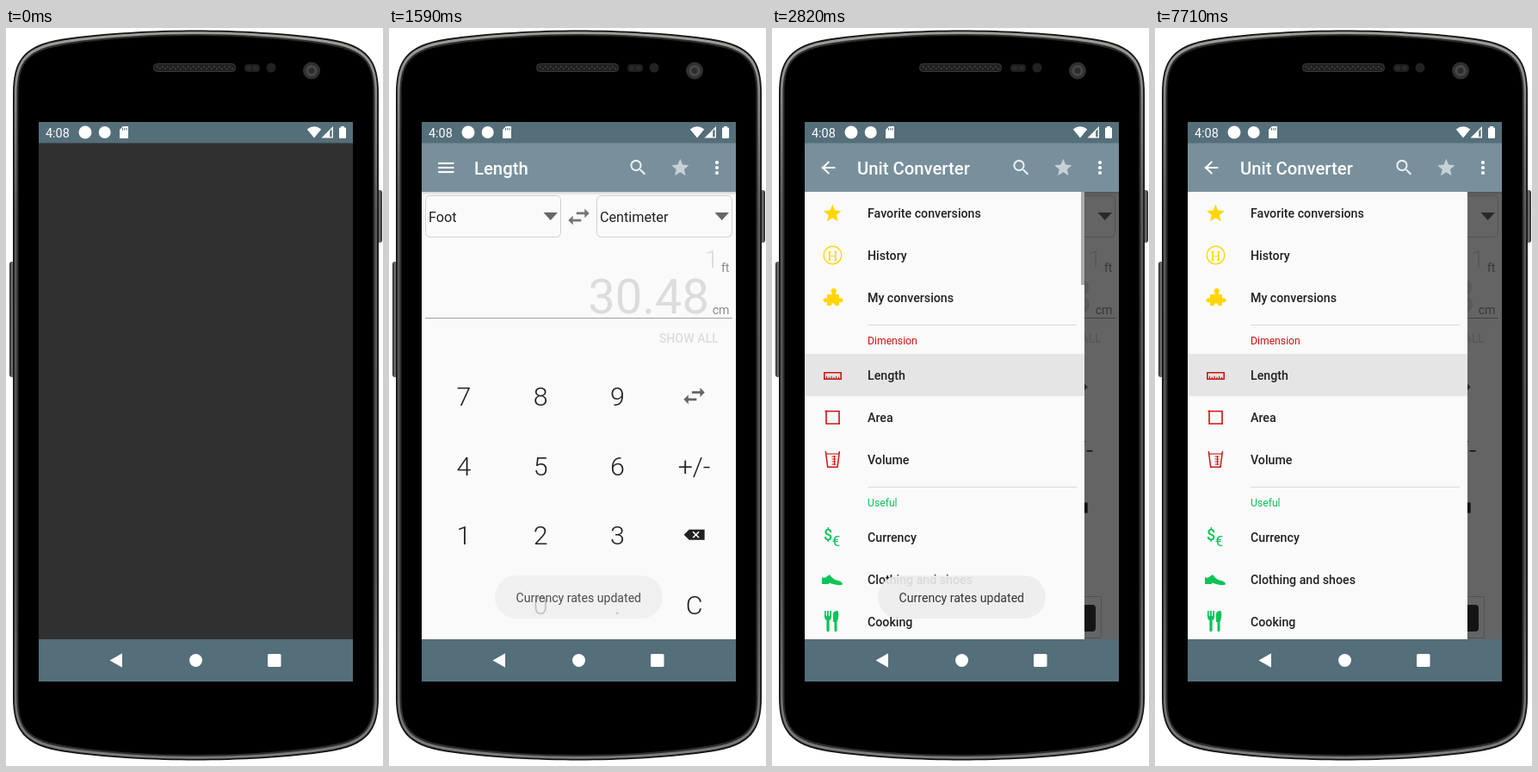
An HTML page with a canvas for the animation above (8000 ms loop, 438 by 856 pixels).

```html
<!DOCTYPE html>
<html lang="en">
<head>
<meta charset="utf-8">
<title>Unit converter demo</title>
<style>
html, body { margin: 0; width: 100%; height: 100%; overflow: hidden; background: #fff; }
canvas { display: block; }
</style>
</head>
<body>
<canvas id="stage" width="438" height="856"></canvas>
<script>
const ctx = document.getElementById('stage').getContext('2d');
const LOOP = 8000, TICK = 76.92, FIRST = 275;
const LEFT = 38, TOP = 190, BOTTOM = 709, DRAWER = 325;
const INK = '#212121', YELLOW = '#ffd600', RED = '#cc1512', GREEN = '#0bc458';

const ICONS = {
  swap: 'M7 11L3 15l4 4v-3h7v-2H7zM21 9l-4-4v3h-7v2h7v3z',
  search: 'M15.5 14h-.8l-.3-.3A6.5 6.5 0 1 0 13.7 14.4l.3.3v.8l5 5L20.5 19zM9.5 14a4.5 4.5 0 1 1 0-9 4.5 4.5 0 0 1 0 9z',
  star: 'M12 17.3L18.2 21l-1.7-7L22 9.2l-7.2-.6L12 2 9.2 8.6 2 9.2l5.5 4.8L5.8 21z',
  puzzle: 'M4 7H9.5V5A3 3 0 1 1 14 5V7H18V11.5H19A2.5 2.5 0 1 1 19 16H18V20H13V18.5A2.2 2.2 0 0 0 9 18.5V20H4V16H3A2.5 2.5 0 1 1 3 11.5H4z',
  shoe: 'M0 3Q3 5 6 2L9 0Q13 6 19 7Q24 8 24 11.5Q19 13 13 11L8 9.5V11H0z',
  fork: 'M0 0h1.6v6h1.4V0h1.8v6h1.4V0H8v7Q8 10 5.6 11V23Q4 25.5 2.4 23V11Q0 10 0 7z',
  knife: 'M10 13V4Q10 0 15.5 0Q17.5 6 14.5 13V23Q13 25.5 11.5 23V13z'
};
for (const k in ICONS) ICONS[k] = new Path2D(ICONS[k]);

const lerp = (a, b, p) => a + (b - a) * p;
const clamp = v => Math.min(1, Math.max(0, v));
const ramp = (t, a, b) => clamp((t - a) / (b - a));

function rect(x, y, w, h, color) {
  ctx.fillStyle = color;
  ctx.fillRect(x, y, w, h);
}

function round(x, y, w, h, r, fill, stroke) {
  ctx.beginPath();
  ctx.roundRect(x, y, w, h, r);
  if (fill) { ctx.fillStyle = fill; ctx.fill(); }
  if (stroke) { ctx.strokeStyle = stroke; ctx.lineWidth = 1; ctx.stroke(); }
}

function disc(x, y, r, color) {
  ctx.beginPath();
  ctx.arc(x, y, r, 0, 7);
  ctx.fillStyle = color;
  ctx.fill();
}

function poly(points, color) {
  ctx.beginPath();
  points.forEach(([x, y]) => ctx.lineTo(x, y));
  ctx.closePath();
  ctx.fillStyle = color;
  ctx.fill();
}

function line(points, color, width) {
  ctx.beginPath();
  points.forEach(([x, y], i) => i ? ctx.lineTo(x, y) : ctx.moveTo(x, y));
  ctx.strokeStyle = color;
  ctx.lineWidth = width;
  ctx.stroke();
}

function text(str, x, y, size, weight, color, align = 'left', family = 'Roboto, sans-serif') {
  ctx.font = `${weight} ${size}px ${family}`;
  ctx.textAlign = align;
  ctx.fillStyle = color;
  ctx.fillText(str, x, y);
}

function shape(name, x, y, scale, color) {
  ctx.save();
  ctx.translate(x, y);
  ctx.scale(scale, scale);
  ctx.fillStyle = color;
  ctx.fill(ICONS[name], 'evenodd');
  ctx.restore();
}

const icon = (name, cx, cy, scale, color) =>
  shape(name, cx - 12 * scale, cy - 12 * scale, scale, color);

function gradient(x0, y0, x1, y1, ...colors) {
  const g = ctx.createLinearGradient(x0, y0, x1, y1);
  colors.forEach((c, i) => g.addColorStop(i / (colors.length - 1), c));
  return g;
}

// Phone outline, shrunk by d on every side
function shell(d, fill) {
  const l = 8 + d, r = 433 - d, t = 2.5 + d, b = 849.5 - d, m = 220.5;
  ctx.beginPath();
  ctx.moveTo(l, 76);
  ctx.bezierCurveTo(l, 38, l + 12, t + 17, l + 58, t + 10);
  ctx.bezierCurveTo(l + 105, t + 3, 175, t, m, t);
  ctx.bezierCurveTo(266, t, r - 105, t + 3, r - 58, t + 10);
  ctx.bezierCurveTo(r - 12, t + 17, r, 38, r, 76);
  ctx.lineTo(r, 776);
  ctx.bezierCurveTo(r, 814, r - 12, b - 17, r - 58, b - 10);
  ctx.bezierCurveTo(r - 105, b - 3, 266, b, m, b);
  ctx.bezierCurveTo(175, b, l + 105, b - 3, l + 58, b - 10);
  ctx.bezierCurveTo(l + 12, b - 17, l, 814, l, 776);
  ctx.closePath();
  ctx.fillStyle = fill;
  ctx.fill();
}

function phone() {
  round(4, 271, 8, 134, 3, gradient(4, 0, 10, 0, '#222', '#777', '#333'));
  round(429, 188, 8, 61, 3, gradient(431, 0, 437, 0, '#333', '#777', '#222'));
  shell(0, '#151515');
  shell(1.8, gradient(0, 3, 0, 849, '#a0a09b', '#5a5a5a', '#555', '#555', '#7d7d7d'));
  shell(4.5, '#2e2e2e');
  shell(6.5, '#000');
  round(171.5, 41.5, 95, 9, 4, '#202020', '#3a3a3a');
  for (let i = 0; i < 30; i++)
    rect(175 + i * 3, 44 + (i % 2) * 2.5, 1.6, 1.6, '#4a4a4a');
  round(277, 42, 18, 9, 4, '#1e1e1e');
  disc(282, 46.5, 3, '#292929');
  disc(290, 46.5, 3, '#292929');
  disc(308, 46, 5.5, '#222');
  disc(355, 49.5, 10, '#303030');
  disc(355, 49.5, 6.5, '#484848');
  disc(355, 49.5, 3.5, '#2c2c2c');
}

function systemBars() {
  rect(LEFT, 109, 365, 24.5, '#546e7a');
  text('4:08', 46, 126.5, 14.4, 400, '#fff');
  disc(92, 121, 7.5, '#fff');
  disc(114.7, 121, 7, '#fff');
  poly([[132, 118], [136, 114], [142, 114], [142, 128], [132, 128]], '#fff');
  for (const x of [135, 137.3, 139.6]) rect(x, 116, 1, 2.6, '#546e7a');

  ctx.beginPath();
  ctx.moveTo(358, 127.5);
  ctx.lineTo(349.8, 117.5);
  ctx.quadraticCurveTo(358, 111, 366.2, 117.5);
  ctx.fillStyle = '#fff';
  ctx.fill();
  poly([[366.5, 127.5], [380, 114], [380, 127.5]], '#fff');
  poly([[376.2, 119.6], [378.6, 117.2], [378.6, 126.2], [376.2, 126.2]], '#546e7a');
  round(387, 115.5, 8, 12.5, 1, '#fff');
  rect(389, 114, 4, 2, '#fff');

  rect(LEFT, BOTTOM, 365, 49, '#546e7a');
  poly([[120.5, 733.5], [135, 725.3], [135, 741.7]], '#fff');
  disc(220.5, 733.5, 7.5, '#fff');
  round(304, 726, 15.5, 15, 1.5, '#fff');
}

// Menu bars turning into a back arrow
function menuArrow(p) {
  const s = 1.014, head = lerp(18, Math.hypot(8, 8), p), shaft = lerp(18, 16, p);
  const turn = Math.PI / 4 * p, off = lerp(5, -1, p), edge = -shaft / 2;
  const w = head * Math.cos(turn), h = head * Math.sin(turn);
  ctx.save();
  ctx.translate(66.3, 162);
  ctx.scale(s, s);
  ctx.rotate(lerp(-Math.PI, 0, p));
  line([[edge + p, 0], [edge + shaft - p, 0]], '#fff', 2);
  line([[edge, off], [edge + w, off + h]], '#fff', 2);
  line([[edge, -off], [edge + w, -off - h]], '#fff', 2);
  ctx.restore();
}

function appBar(t, p) {
  rect(LEFT, 133, 365, 57, '#78909c');
  const glow = 0.27 * ramp(t, 2200, 2400) * (1 - ramp(t, 2500, 2780));
  if (glow) disc(66, 162, 19.5, `rgba(255,255,255,${glow})`);
  menuArrow(p);
  text(t < 2800 ? 'Length' : 'Unit Converter', 99, 170, 20.3, 500, '#fff');
  icon('search', 289.5, 162, 1.014, '#e9edef');
  icon('star', 338.3, 162, 1.014, '#c6d0d5');
  for (const y of [156, 162, 168]) disc(381, y, 2.1, '#fff');
}

function spinner(x, label) {
  round(x + 0.5, 194.5, 157, 48, 5, null, '#d0d0d0');
  text(label, x + 4, 225, 16.2, 400, INK);
  poly([[x + 137.5, 214], [x + 154, 214], [x + 145.7, 223]], '#666');
}

function eraser(x, y) {
  poly([[x - 12, y], [x - 6, y - 6], [x + 12, y - 6], [x + 12, y + 6], [x - 6, y + 6]], INK);
  line([[x - 1.5, y - 3.5], [x + 5.5, y + 3.5]], '#fff', 1.6);
  line([[x - 1.5, y + 3.5], [x + 5.5, y - 3.5]], '#fff', 1.6);
}

function converter(t) {
  const done = t >= 580, banner = t >= 2730;
  rect(LEFT, TOP, 365, 519, '#fafafa');
  spinner(42, 'Foot');
  spinner(241, 'Centimeter');
  icon('swap', 220.5, 219, 1.36, '#757575');
  text('1', done ? 383 : 392, 278, 28.4, 300, '#d9d9d9', 'right');
  if (done) {
    text('ft', 395.5, 283, 14.2, 400, '#8c8c8c', 'right');
    text('30.48', 372, 331, 56, 400, '#dcdcdc', 'right');
    text('cm', 395.5, 332, 14.2, 400, '#8c8c8c', 'right');
  }
  rect(42, 336, 357, 1, '#a0a0a0');
  text('SHOW ALL', 383, 365, 14.2, 500, '#dcdcdc', 'right');

  const rows = ['789~', '456±', '123<', ' 0.C'], step = ((banner ? 659 : BOTTOM) - 387) / 4;
  rows.forEach((row, r) => [...row].forEach((key, c) => {
    const x = 87 + c * 89.2, y = 387 + step * (r + 0.5);
    if (key === '~') icon('swap', x, y - 0.5, 1.36, '#666');
    else if (key === '<') eraser(x, y - 0.5);
    else text(key === '±' ? '+/-' : key, x, y + 11, 30.4, 300, INK, 'center');
  }));
  if (banner) {
    round(57.5, 659.5, 325, 48, 1, '#fafafa', '#ccc');
    round(296, 669, 80, 31, 4, '#333');
  }
  rect(LEFT, TOP, 365, 4, gradient(0, TOP, 0, TOP + 4, 'rgba(0,0,0,.16)', 'rgba(0,0,0,0)'));
}

function drawerIcons() {
  icon('star', 70.3, 215, 1.014, YELLOW);
  ctx.beginPath();
  ctx.arc(70.5, 263.5, 10.3, 0, 7);
  ctx.strokeStyle = YELLOW;
  ctx.lineWidth = 1.2;
  ctx.stroke();
  text('H', 70.5, 269.5, 17, 400, YELLOW, 'center', '"Liberation Serif", serif');
  shape('puzzle', 60, 302, 1, YELLOW);

  line([[60, 407.3], [60.8, 407.3], [60.8, 399.8], [80.2, 399.8], [80.2, 407.3], [60, 407.3]], RED, 1.6);
  for (let i = 0; i < 6; i++)
    line([[63.5 + i * 2.8, 407], [63.5 + i * 2.8, 403.8 + i % 2]], RED, 1.1);
  line([[61.5, 444.5], [78, 444.5], [78, 459.5]], RED, 1.6);
  line([[63, 443.5], [63, 459], [79, 459]], RED, 1.6);
  line([[62.3, 491], [64.7, 509.3], [76, 509.3], [78.4, 491]], RED, 1.5);
  line([[63, 494], [78, 494]], RED, 1.1);
  line([[72.5, 496], [72.5, 507]], RED, 1.1);
  for (const y of [497, 500, 503, 506]) line([[69.5, y], [74.5, y]], RED, 1);

  text('$', 65, 594, 18, 500, GREEN, 'center');
  text('€', 74.5, 600.5, 17, 400, GREEN, 'center');
  shape('shoe', 58, 634, 1, GREEN);
  shape('fork', 61, 676, 1, GREEN);
  shape('knife', 61, 676, 1, GREEN);
}

function drawer(t, p) {
  rect(LEFT, TOP, 365, 519, `rgba(0,0,0,${0.6 * p})`);
  ctx.save();
  ctx.translate(-DRAWER * (1 - p), 0);
  const edge = LEFT + DRAWER;
  rect(LEFT, TOP, DRAWER, 519, '#fafafa');
  rect(LEFT, 378, DRAWER, 49, '#e5e5e5');
  rect(111, 344, 243, 1, '#d8d8d8');
  rect(111, 532, 243, 1, '#d8d8d8');
  const labels = [
    ['Favorite conversions', 215], ['History', 264], ['My conversions', 312.7],
    ['Length', 403], ['Area', 452], ['Volume', 500.5],
    ['Currency', 591], ['Clothing and shoes', 640], ['Cooking', 688.7]
  ];
  for (const [label, y] of labels) text(label, 111, y + 5, 14.2, 500, INK);
  text('Dimension', 111, 367, 12.2, 400, p < 0.7 ? INK : RED);
  text('Useful', 111, 555, 12.2, 400, p < 0.7 ? INK : GREEN);
  drawerIcons();
  const bar = 1 - ramp(t, 3830, 4190);
  if (bar) rect(edge - 4, TOP, 4, 108, `rgba(130,130,130,${0.65 * bar})`);
  ctx.restore();
}

function toast(t) {
  const dip = 0.2 * (1 - clamp(Math.abs(t - 1660) / 230)) * (t >= 1580);
  const a = ramp(t, 815, 1275) * (1 - ramp(t, 3815, 4190)) - dip;
  if (a <= 0) return;
  ctx.globalAlpha = a;
  round(123, 635, 195, 50, 25, 'rgba(238,238,238,.9)');
  text('Currency rates updated', 220.3, 665.5, 14.1, 400, '#333', 'center');
  ctx.globalAlpha = 1;
}

function draw(now) {
  const raw = now % LOOP;
  const t = raw < FIRST ? 0 : FIRST + Math.floor((raw - FIRST) / TICK) * TICK;
  // Quintic settle, as in a fling that comes to rest
  const p = 1 - (1 - ramp(t, 2338, 2850)) ** 5;

  rect(0, 0, 438, 856, '#fff');
  phone();
  ctx.save();
  ctx.beginPath();
  ctx.rect(LEFT, 133, 365, BOTTOM - 133);
  ctx.clip();
  if (t >= FIRST) {
    converter(t);
    if (p > 0) drawer(t, p);
    appBar(t, p);
    toast(t);
  }
  ctx.globalAlpha = t < FIRST ? 1 : t < FIRST + TICK / 2 ? 0.5 : 0;
  rect(LEFT, 133, 365, 577, '#303030');
  ctx.restore();
  systemBars();
}

const start = performance.now();
function tick() {
  draw(performance.now() - start);
  requestAnimationFrame(tick);
}
tick();
</script>
</body>
</html>
```
